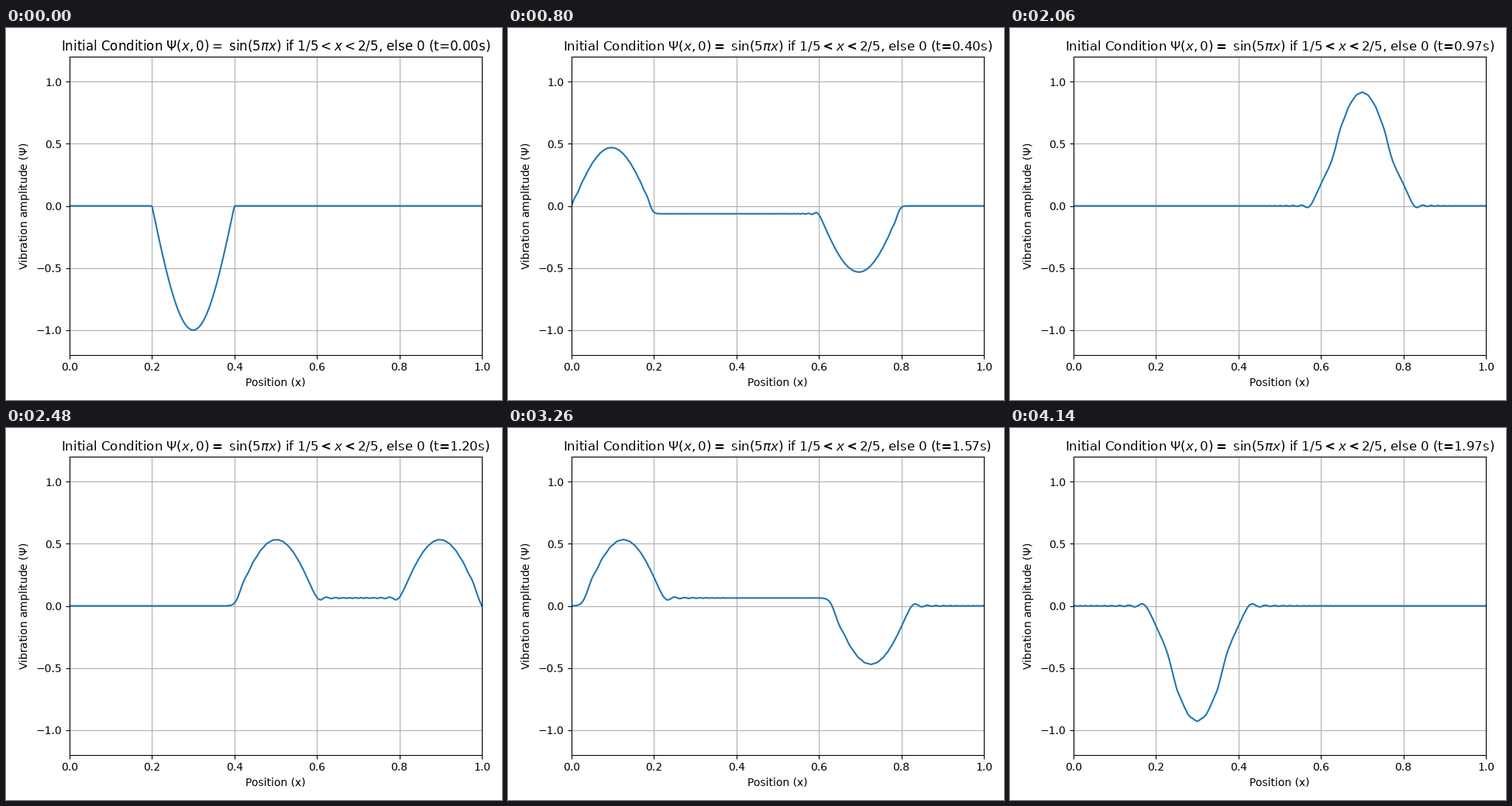
Animation of 640 by 480 pixels, one loop 4.16 s. Source, as a matplotlib script:

```python
import numpy as np
import matplotlib.pyplot as plt
from matplotlib.animation import FuncAnimation

# Vibrating string with fixed ends, leapfrog scheme
NX, COURANT, DT, STRIDE, POSES = 500, 0.5, 0.001, 25, 80
x = np.linspace(0, 1, NX)

# Uneven hold pattern: five poses last 1, 5, 1, 5, 1 ticks of 20 ms
TICK = 20
STARTS = np.array([0, 1, 6, 7, 12])
CYCLE = 13

AXES_TOP = 37.3  # pixels from the upper edge


def laplacian(u):
    d = np.zeros_like(u)
    d[1:-1] = u[2:] - 2 * u[1:-1] + u[:-2]
    return d


def solve():
    c2 = COURANT ** 2
    u0 = np.where((x > 0.2) & (x < 0.4), np.sin(5 * np.pi * x), 0.0)
    # the initial velocity has the same profile as the displacement
    prev, cur = u0, u0 + DT * u0 + 0.5 * c2 * laplacian(u0)
    poses = [u0]
    for n in range(1, STRIDE * (POSES - 1) + 1):
        if n % STRIDE == 0:
            poses.append(cur)
        prev, cur = cur, 2 * cur - prev + c2 * laplacian(cur)
    return poses


def title(t):
    return (r"Initial Condition $\Psi(x,0)=$ $\sin(5\pi x)$ if $1/5<x<2/5$, "
            f"else 0 (t={t:.2f}s)")


poses = solve()

fig, ax = plt.subplots(figsize=(6.4, 4.8), dpi=100)
line, = ax.plot(x, poses[0])
ax.set_xlim(0, 1)
ax.set_ylim(-1.2, 1.2)
ax.set_xlabel("Position (x)")
ax.set_ylabel(r"Vibration amplitude ($\Psi$)")
ax.set_title(title(0))
ax.grid(True)
fig.tight_layout()
fig.subplots_adjust(top=1 - AXES_TOP / 480)
# the font's own hints keep the title letters from growing a pixel taller
plt.rcParams["text.hinting"] = "default"


def update(i):
    cycle, tick = divmod(i, CYCLE)
    k = 5 * cycle + int(np.searchsorted(STARTS, tick, side="right")) - 1
    line.set_ydata(poses[k])
    # half hundredths round down
    ax.set_title(title(max(0.0, k * STRIDE * DT - 1e-9)))
    return line,


anim = FuncAnimation(fig, update, frames=POSES // 5 * CYCLE, interval=TICK,
                     repeat=True, repeat_delay=0, blit=False)
plt.show()
```
